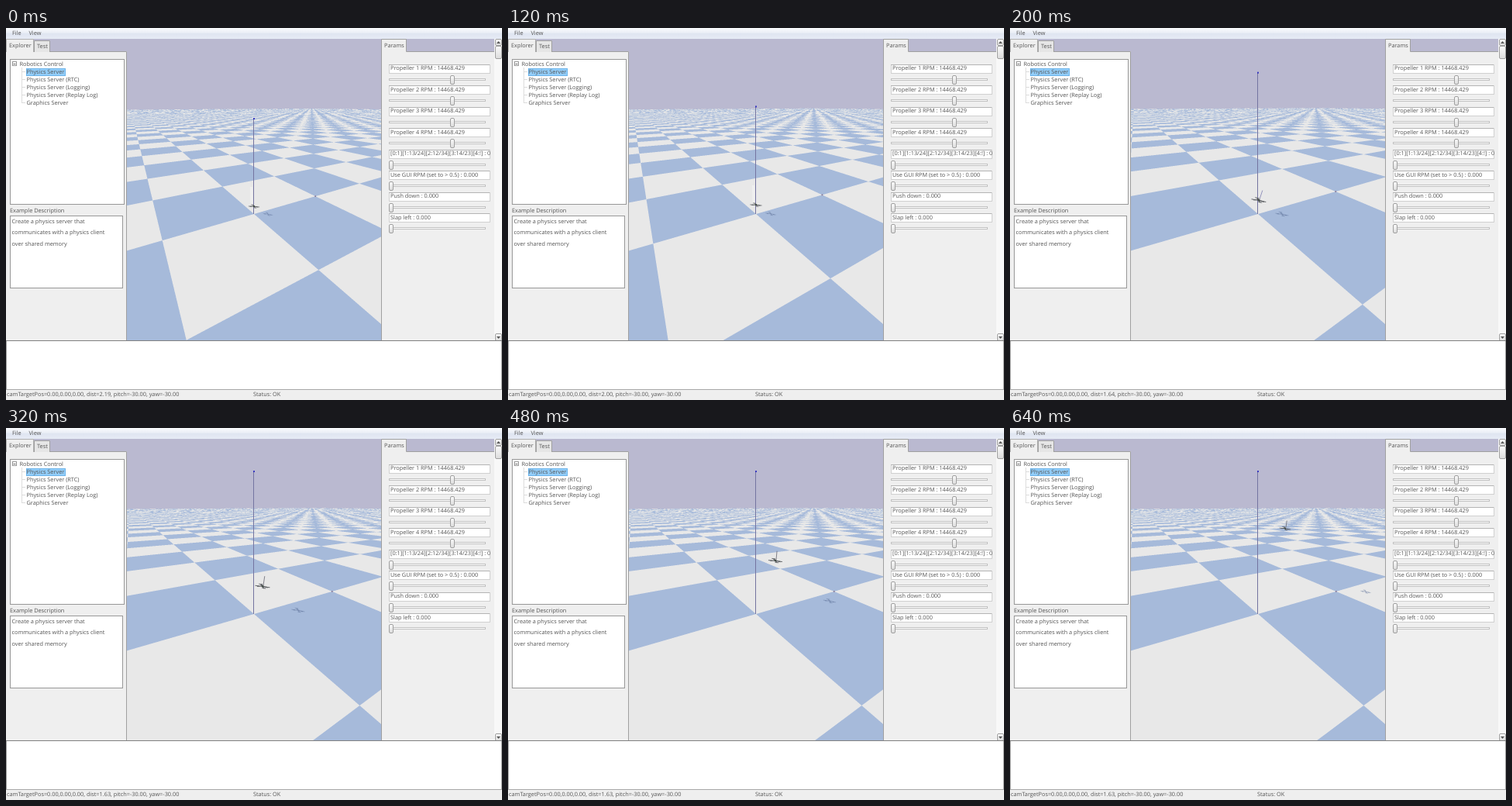
These frames come from a looping animation (640x480 px, 0.68 s). An HTML page with a canvas:

```html
<!DOCTYPE html>
<html lang="en">
<head>
<meta charset="utf-8">
<title>Physics server</title>
<style>
html, body { margin: 0; width: 640px; height: 480px; overflow: hidden; background: #bab9d0; }
canvas, svg { position: absolute; left: 0; top: 0; display: block; }
text { font: 7.34px "Open Sans", sans-serif; fill: #555; white-space: pre; text-rendering: geometricPrecision; }
</style>
</head>
<body>
<canvas id="view" width="640" height="480"></canvas>
<svg id="ui" width="640" height="480" viewBox="0 0 640 480">
  <defs>
    <linearGradient id="menu" x2="0" y2="1">
      <stop offset="0" stop-color="#fafbfd"/><stop offset=".45" stop-color="#eaeef6"/>
      <stop offset=".5" stop-color="#dfe5f1"/><stop offset="1" stop-color="#e6ebf5"/>
    </linearGradient>
    <linearGradient id="knob" x2="0" y2="1">
      <stop offset="0" stop-color="#fafafa"/><stop offset="1" stop-color="#dcdcdc"/>
    </linearGradient>
    <clipPath id="fields"><rect x="494" y="40" width="131" height="230"/></clipPath>
  </defs>
</svg>
<script>
const STEP = 40, LOOP = 680;
const F = 240, CX = 320, CY = 240;
const COS = Math.sqrt(3) / 2, SIN = 0.5;
const VIEW = { x: 156, y: 96, w: 329, h: 308 };
const SKY = [186, 185, 208], WHITE = [232, 232, 232], BLUE = [166, 186, 218];
const SUB = 3;

const ui = document.getElementById("ui");
const ctx = document.getElementById("view").getContext("2d");

// ---- Interface ----
function add(tag, attrs, parent = ui) {
  const el = document.createElementNS("http://www.w3.org/2000/svg", tag);
  for (const k in attrs) el.setAttribute(k, attrs[k]);
  return parent.appendChild(el);
}
const fill = (x, y, width, height, color) => add("rect", { x, y, width, height, fill: color });
const box = (x, y, w, h, color, stroke, rx = 0) =>
  add("rect", { x: x + 0.5, y: y + 0.5, width: w - 1, height: h - 1, fill: color, stroke, rx });
const path = (d, stroke, color = "none") => add("path", { d, stroke, fill: color });
function label(x, y, str, parent) {
  const el = add("text", { x, y }, parent);
  el.textContent = str;
  return el;
}
const knob = (x, y, w, h) => box(x, y, w, h, "url(#knob)", "#a0a0a0", 1.5);

function buildMenu() {
  fill(0, 0, 640, 14, "url(#menu)");
  label(8, 9, "File");
  label(29.5, 9, "View");
}

function buildExplorer() {
  fill(0, 30, 156, 374, "#efefef");
  path("M57 30.5H155.5V404", "#a0a0a0");
  path("M36.5 31V16.5H56.5V31", "#a0a0a0", "#e6e6e6");
  path("M0.5 31V14.5H35.5V31", "#b0b0b0", "#efefef");
  label(4, 24.5, "Explorer");
  label(40, 25.5, "Test");

  box(5, 40, 148, 188, "#fff", "#989898");
  box(8, 43, 6, 6, "#fff", "#989898");
  path("M9.5 46.5H12.5", "#666");
  label(17.5, 48.7, "Robotics Control");
  path("M20.5 51V97" + [57, 67, 77, 87, 97].map(y => `M20 ${y - 0.5}H25`).join(""), "#dcdcdc");
  box(26, 52, 51, 10, "#92cdf9", "#6cb4ea");
  ["Physics Server", "Physics Server (RTC)", "Physics Server (Logging)",
   "Physics Server (Replay Log)", "Graphics Server"]
    .forEach((s, i) => label(26.5, 59.3 + i * 10, s));

  label(5, 238.2, "Example Description");
  box(5, 242, 146, 94, "#fff", "#989898");
  ["Create a physics server that", "communicates with a physics client", "over shared memory"]
    .forEach((s, i) => label(7.5, 251.8 + i * 14.4, s));
}

function buildParams() {
  fill(484, 30, 146, 374, "#efefef");
  path("M484.5 404V14.5H516.5V30.5H630", "#a0a0a0");
  path("M485 31V15H516V31Z", "none", "#efefef");
  label(488, 24.5, "Params");

  const names = [1, 2, 3, 4].map(n => `Propeller ${n} RPM : 14468.429`).concat(
    "[0:1][1:13/24][2:12/34][3:14/23][4:!] : 0.000",
    "Use GUI RPM (set to > 0.5) : 0.000", "Push down : 0.000", "Slap left : 0.000");
  names.forEach((name, i) => {
    const y = Math.floor(47 + i * 27.5);
    box(494, y, 131, 12, "#fff", "#d0d0d0");
    path(`M494 ${y + 0.5}H624`, "#b4b4b4");
    box(494, y + 18, 125, 3, "#fff", "#c0c0c0");
    knob(i < 4 ? 573 : 494, y + 14, 6, 12);
  });
  const g = add("g", { "clip-path": "url(#fields)" });
  names.forEach((name, i) => label(496, 54.4 + i * 27.5, name, g));

  fill(630, 14, 10, 390, "#f8f8f8");
  knob(631, 14, 9, 9);
  knob(631, 23, 9, 17);
  knob(631, 394, 9, 10);
  path("M633 20H638L635.5 17Z", "none", "#555");
  path("M633 398H638L635.5 401Z", "none", "#555");
}

function buildConsole() {
  fill(0, 404, 640, 62, "#fff");
  path("M0 403.5H640", "#808080");
  path("M0.5 404V466M639.5 404V466", "#a0a0a0");
  fill(0, 466, 640, 14, "#efefef");
  path("M0 466.5H640", "#a8a8a8");
  label(319, 475, "Status: OK");
  return label(1, 475, "");
}

buildMenu();
buildExplorer();
buildParams();
const status = buildConsole();

// ---- Motion ----
const DIST = [2.19, 2.17, 2.11, 2, 1.69, 1.64, 1.63];

// time, drone x, y, shadow x, y, scale, tilt in degrees
const POSES = [
  [0, 320, 230, 338, 240, 0.75, 0],
  [120, 320, 228, 339, 239.5, 0.8, 0],
  [160, 320, 224, 346, 240, 0.92, 18],
  [200, 321, 222, 351, 240, 1, 17],
  [320, 331, 204, 377, 235, 1, 8],
  [480, 345, 171, 415, 223, 0.95, 5],
  [640, 355, 129.5, 459, 211, 0.78, 7]
];

// Cubic through the poses, with slopes taken from their neighbours.
function poseAt(t) {
  const n = POSES.length;
  let i = 0;
  while (i < n - 2 && t >= POSES[i + 1][0]) i++;
  const slope = (j, c) => {
    const a = POSES[Math.max(j - 1, 0)], b = POSES[Math.min(j + 1, n - 1)];
    return (b[c] - a[c]) / (b[0] - a[0]);
  };
  const p = POSES[i], q = POSES[i + 1], span = q[0] - p[0], s = (t - p[0]) / span;
  const h = s * s * (3 - 2 * s);
  return p.map((v, c) => v + (q[c] - v) * h
    + span * s * (1 - s) * ((1 - s) * slope(i, c) - s * slope(i + 1, c)));
}

// ---- Scene ----
function project(right, ahead, up, dist) {
  const depth = dist + ahead * COS - up * SIN;
  return [CX + F * right / depth, CY - F * (ahead * SIN + up * COS) / depth];
}

function groundColor(sx, sy, dist) {
  const k = (CY - sy) / F, drop = SIN - COS * k;
  if (drop <= 0) return SKY;
  const reach = dist * SIN / drop;
  const r = reach * (sx - CX) / F, u = reach * (COS + SIN * k) - dist * COS;
  const gx = COS * r + SIN * u, gy = COS * u - SIN * r;
  if (Math.abs(gx) > 100 || Math.abs(gy) > 100) return SKY;
  return (Math.floor(gx) + Math.floor(gy)) & 1 ? BLUE : WHITE;
}

const floors = new Map();
function floorImage(dist) {
  if (floors.has(dist)) return floors.get(dist);
  const img = ctx.createImageData(VIEW.w, VIEW.h);
  let o = 0;
  for (let y = 0; y < VIEW.h; y++) for (let x = 0; x < VIEW.w; x++) {
    let r = 0, g = 0, b = 0;
    for (let s = 0; s < SUB * SUB; s++) {
      const c = groundColor(VIEW.x + x + (s % SUB + 0.5) / SUB,
                            VIEW.y + y + (Math.floor(s / SUB) + 0.5) / SUB, dist);
      r += c[0]; g += c[1]; b += c[2];
    }
    img.data[o++] = r / (SUB * SUB);
    img.data[o++] = g / (SUB * SUB);
    img.data[o++] = b / (SUB * SUB);
    img.data[o++] = 255;
  }
  floors.set(dist, img);
  return img;
}

function line(x1, y1, x2, y2, color, width = 1) {
  ctx.strokeStyle = color;
  ctx.lineWidth = width;
  ctx.beginPath();
  ctx.moveTo(x1, y1);
  ctx.lineTo(x2, y2);
  ctx.stroke();
}

function dot(x, y, size, color) {
  ctx.fillStyle = color;
  ctx.fillRect(x - size / 2, y - size / 2, size, size);
}

const ROTORS = [[-7, 0.5], [-2.5, -2], [7, 1.5], [2, 3]];

function craft(x, y, scale, tilt, arm, rotor) {
  ctx.save();
  ctx.translate(x, y);
  ctx.rotate(tilt);
  ctx.scale(scale, scale);
  for (const [rx, ry] of ROTORS) {
    line(0, 0, rx, ry, arm, 1.2);
    line(rx - 2.5, ry - 0.6, rx + 2.5, ry - 0.2, rotor, 1);
  }
  ctx.restore();
}

function drawScene(t, dist) {
  ctx.clearRect(0, 0, 640, 480);
  ctx.putImageData(floorImage(dist), VIEW.x, VIEW.y);
  const [, x, y, sx, sy, scale, tilt] = poseAt(t);
  const lean = tilt * Math.PI / 180;

  const [ax, ay] = project(COS, SIN, 0, dist);
  dot(ax, ay, 1.6, "#85718f");
  craft(sx, sy, scale * 0.9, 0.1, "rgba(90,110,150,.5)", "rgba(90,110,150,.45)");

  const topY = project(0, 0, 1, dist)[1];
  line(CX - 0.5, CY, CX - 0.5, topY, "#7474a0");
  dot(CX, topY, 2, "#3838c0");

  if (t < 160) line(x - 3, y - 2, x - 3.5, y - 25, "#f0f0f0", 3);
  else line(x + 1, y - 1, x + 1 + 13 * scale * Math.sin(lean), y - 13 * scale * Math.cos(lean),
            t < 240 ? "#8c8cb8" : "#74747e", 0.9);
  craft(x, y, scale, lean * 0.4, "#4a4d52", "#66696c");
  dot(x, y, 2.5 * scale, "#404a44");
}

let shown = -1;
function show(time) {
  const step = Math.floor((time % LOOP) / STEP);
  if (step === shown) return;
  shown = step;
  const dist = DIST[Math.min(step, DIST.length - 1)];
  drawScene(step * STEP, dist);
  status.textContent = `camTargetPos=0.00,0.00,0.00, dist=${dist.toFixed(2)}, pitch=-30.00, yaw=-30.00`;
}

DIST.forEach(floorImage);
const start = performance.now();
function tick() {
  show(performance.now() - start);
  requestAnimationFrame(tick);
}
tick();
</script>
</body>
</html>
```
